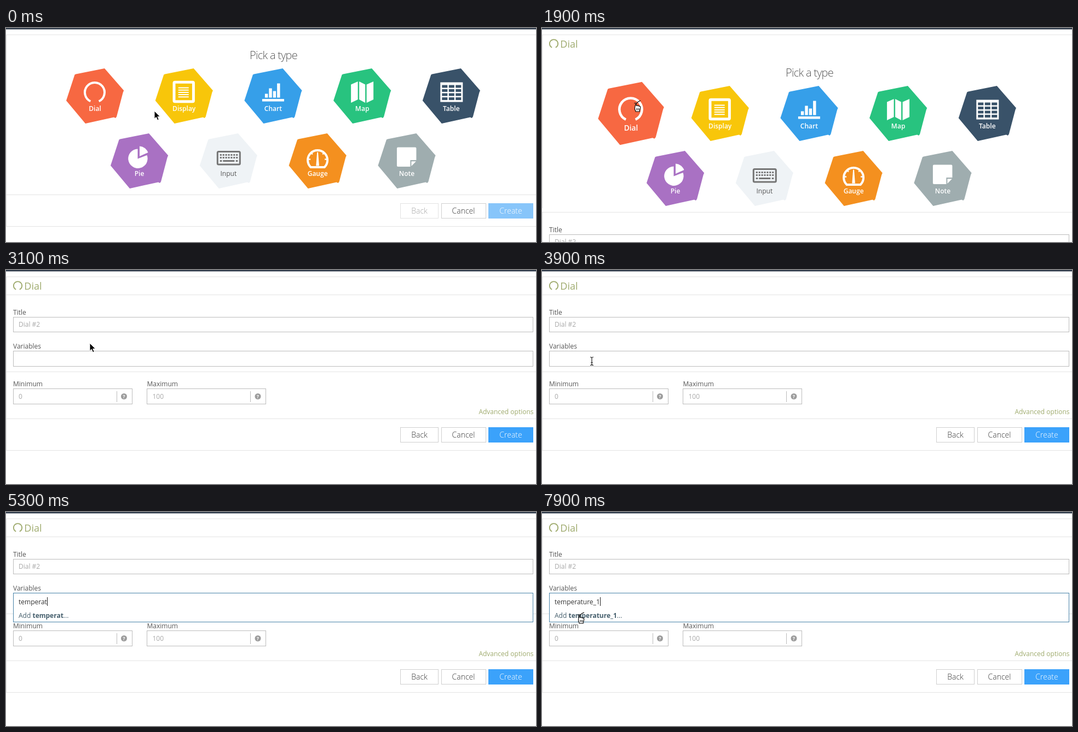
These frames come from a looping animation (968 by 392 pixels, 8000 ms). An HTML page:

```html
<!DOCTYPE html>
<html lang="en">
<head>
<meta charset="utf-8">
<title>Pick a type</title>
<style>
  html, body { margin: 0; width: 100%; height: 100%; overflow: hidden; background: #fff; }
  svg { display: block; width: 968px; height: 392px; font: 12px "Open Sans", sans-serif; fill: #555; }
  .edge { fill: none; stroke: #e4e4e4; }
  .field { fill: #fff; stroke: #bcbcbc; }
  .hint { fill: #a9a9a9; }
  .mid { text-anchor: middle; }
  .olive { fill: #9fab6e; }
  .w { fill: #fff; }
  .ws { fill: none; stroke: #fff; }
  .label { fill: #fff; font-weight: 600; }
  .btn { font-size: 14px; font-weight: 300; fill: #333; text-anchor: middle; }
  .name { font-weight: 700; fill: #465c6c; }
  .meta { font-size: 9px; fill: #4a4a4a; }
  .meta .val { font-weight: 300; fill: #7f8f9c; }
  .drop { fill: #fff; stroke: #4682a8; }
  .typed { fill: #333; }
  .add { fill: #435d6b; }
  .add tspan { font-weight: 700; }
</style>
</head>
<body>
<svg viewBox="0 0 968 392">
  <rect width="968" height="392" fill="#fff"/>
  <rect width="968" height="2.5" fill="#303b4b"/>
  <path class="edge" d="M968 12.5H.5V330"/>

  <g id="picker">
    <text class="mid" x="488.5" y="57" style="font-size:20px;font-weight:300;letter-spacing:-.75px">Pick a type</text>
    <g id="types"></g>
  </g>
  <g id="pickFoot" transform="translate(0 305)"></g>

  <g id="head">
    <path id="headIcon" fill="none" stroke="#9fab6e" stroke-width="1.8"/>
    <text class="olive" x="33.3" y="36" style="font-size:18px">Dial</text>
  </g>

  <g id="form">
    <rect y="45" width="968" height="347" fill="#fff"/>
    <path class="edge" d="M.5 45V272M0 45.5H968M0 186.5H968"/>
    <text x="13" y="82">Title</text>
    <rect class="field" x="13.5" y="86.5" width="949" height="27"/>
    <text class="hint" x="23" y="104">Dial #2</text>
    <text x="13" y="144">Variables</text>
    <rect class="field" x="13.5" y="148.5" width="949" height="28"/>
    <g id="limits"></g>
    <text class="olive" x="963.5" y="264" text-anchor="end">Advanced options</text>
    <g id="formFoot" transform="translate(0 272)"></g>
  </g>

  <g id="drop">
    <rect id="dropBox" class="drop" x="13.5" y="148.5" width="949"/>
    <text id="typed" class="typed" x="23" y="169"></text>
    <path id="caret" d="M23.5 156V172" stroke="#222"/>
    <g id="list"></g>
    <text id="add" class="add" x="23" y="194">Add <tspan id="addWord"></tspan>...</text>
  </g>

  <g id="cursor" stroke-linejoin="round">
    <path id="arrow" d="M0 0V14.3L3.3 11.3L5.7 16.8L8.2 15.7L5.8 10.3H10.3Z" fill="#000" stroke="#fff"/>
    <g id="hand">
      <path d="M-1.6 1C-1.6-.6 1-.6 1.2 1L2 5C2.4 3.9 4.3 4 4.6 5.3C5.3 4.6 6.8 4.9 7 6C8 5.5 9.2 6.2 9.2 7.4C9.4 10 8.6 11.6 7.8 13.2V15.5H.4V14C-1.6 12.2-3-.0 9.4-4.4 8C-5 6.6-3.2 5.7-2 6.9L-.6 8.3Z" fill="#fff" stroke="#000" stroke-width="1.1"/>
      <path d="M2.2 9.5V13M4.4 9.5V13M6.5 9.5V13" stroke="#000" stroke-width=".9"/>
    </g>
    <path id="beam" d="M-3-7.5Q0-7.5 0-5.5Q0-7.5 3-7.5M0-5.5V5.5M-3 7.5Q0 7.5 0 5.5Q0 7.5 3 7.5M-1.8 2.5H1.8" fill="none" stroke="#222" stroke-width="1.2"/>
  </g>
</svg>

<script>
const $ = id => document.getElementById(id);
const box = (x, y, w, h, more = 'class="w"') =>
  `<rect x="${x}" y="${y}" width="${w}" height="${h}" ${more}/>`;
const shape = (d, more = 'class="w"') => `<path d="${d}" ${more}/>`;
const line = (d, width, more = '') => shape(d, `class="ws" stroke-width="${width}" ${more}`);

// Ring with an opening at the bottom
function ring(x, y, r) {
  const dx = r * Math.sin(.44), dy = r * Math.cos(.44);
  return `M${x - dx} ${y + dy}A${r} ${r} 0 1 1 ${x + dx} ${y + dy}`;
}

function tableIcon() {
  let s = box(-20, -25, 41, 36);
  for (let i = 0; i < 12; i++)
    s += box(-17 + i % 3 * 12.5, -20 + Math.floor(i / 3) * 7.5, 10, 5, 'fill="#395269"');
  return s;
}

function gaugeIcon() {
  let s = line('M-12.5 11.5A18 18 0 1 1 12.5 11.5Z', 4, 'stroke-linejoin="round"');
  for (let a = -90; a <= 90; a += 45)
    if (a) s += box(-1.2, -18, 2.4, 5, `class="w" transform="translate(0 -3) rotate(${a})"`);
  return s + shape('M-.9-16H.9L2.8 9H-2.8Z');
}

const icons = {
  Dial: line(ring(-.5, -6.5, 18), 4),
  Display: box(-18.2, -25.2, 35.4, 35.4, 'class="ws" stroke-width="5" rx="1.5"') +
    line('M-10.5-15H8.5M-10.5-10.8H8.5M-10.5-6.6H8.5M-10.5-2.4H8.5M-10.5 1.8H8.5', 2),
  Chart: box(-20, 5.5, 40, 4.5) +
    [-4, -14, -9, -23].map((top, i) => box(-15 + i * 7.4, top, 5.4, 7 - 4 - top)).join(''),
  Map: shape('M-20.5-21L-8-26.5V6.5L-20.5 12.5ZM-5.5-26.5L5.5-21V12.5L-5.5 6.5ZM8-21L20.5-26.5V6.5L8 12.5Z'),
  Table: tableIcon(),
  Pie: shape('M-3-4V-22A17.7 17.7 0 1 0 14-10.5Z') + shape('M.5-8.5V-27A18 18 0 0 1 16-15.5Z'),
  Input: box(-20, -17, 41, 23.5, 'rx="2" fill="none" stroke="#757575" stroke-width="3"') +
    shape('M-15.5-11H17M-15.5-6H17', 'stroke="#757575" stroke-width="2.8" stroke-dasharray="3 1.9"') +
    shape('M-15.5 0H-12M-10 0H11M13.5 0H17', 'stroke="#757575" stroke-width="2.8"'),
  Gauge: gaugeIcon(),
  Note: shape('M-16-25H15.5Q17.5-25 17.5-23V-1.5H6.5V10.5H-16Q-18 10.5-18 8.5V-23Q-18-25-16-25Z') +
    shape('M8.5 .8H17L8.5 9.5Z')
};

const colors = {
  Dial: '#f76842', Display: '#f8c60a', Chart: '#369fe9', Map: '#28c37f', Table: '#395269',
  Pie: '#a971c3', Input: '#eff3f6', Gauge: '#f4901f', Note: '#9fadaf'
};
const hex = 'M17.5-50.5L52.7-10L51.2-6.5L39.5 38L37.5 40.5L34.5 39L-17.5 50.5L-52.5 8.5L-37-39L-35-40Z';

$('types').innerHTML = Object.keys(colors).map((name, i) => {
  const x = i < 5 ? 162.5 + i * 162.7 : 243.5 + (i - 5) * 162.8;
  const y = i < 5 ? 124.5 : 243.5;
  const label = name === 'Input' ? '' : ' label';
  return `<g transform="translate(${x} ${y})"><g id="type${name}">` +
    shape(hex, `fill="${colors[name]}"`) + icons[name] +
    `<text class="mid${label}" y="27.5">${name}</text></g></g>`;
}).join('');

$('headIcon').setAttribute('d', ring(21.5, 28.8, 7.7));

function footer(ready) {
  const back = ready ? '' : 'style="fill:#a5a5a5"';
  return box(0, .5, 969, 58, 'fill="#fff"') +
    shape('M.5 0V58.5H968M0 .5H968', 'class="edge"') +
    box(720.5, 16.5, 69, 27, `fill="#fff" stroke="${ready ? '#cfcfcf' : '#e2e2e2'}"`) +
    box(795.5, 16.5, 81, 27, 'fill="#fff" stroke="#cfcfcf"') +
    box(881, 16, 82, 28, `fill="${ready ? '#3ba2fb' : '#87c5fa'}"`) +
    `<text class="btn" x="755" y="35" ${back}>Back</text>` +
    '<text class="btn" x="835.5" y="35">Cancel</text>' +
    '<text class="btn" x="922" y="35" style="fill:#fff">Create</text>';
}
$('pickFoot').innerHTML = footer(false);
$('formFoot').innerHTML = footer(true);

$('limits').innerHTML = [[13, 'Minimum', 0], [257.5, 'Maximum', 100]].map(([x, name, value]) =>
  `<text x="${x}" y="213">${name}</text>` +
  box(Math.floor(x) + .5, 217.5, 217, 28, 'class="field"') +
  shape(`M${Math.floor(x) + 189.5} 222V242`, 'class="field"') +
  `<text class="hint" x="${x + 10}" y="236">${value}</text>` +
  `<circle cx="${x + 202.5}" cy="231.5" r="5.5" fill="#9c9c9c"/>` +
  `<text class="mid" x="${x + 202.5}" y="235" style="font-size:9px;font-weight:700;fill:#fff">?</text>`
).join('');

const stackIcon = shape('M23 201.5Q26.5 199.5 30 201.5V207.5Q26.5 209.5 23 207.5Z', 'fill="#444"') +
  line('M23 203.2H30M23 205.6H30', .6);
const cogsIcon = '<g fill="none" stroke="#444"><circle cx="26" cy="221" r="2" stroke-width="1.8"/>' +
  '<circle cx="30.7" cy="218.7" r="1" stroke-width="1.2"/><circle cx="30.7" cy="223.3" r="1" stroke-width="1.2"/></g>';
$('list').innerHTML = [
  ['gps_lastread', 'Zelorn GPS #1', 'Checagem de GPS'],
  ['bearing', 'App Tracking', 'Tulio APP V2'],
  ['bearing', 'App Tracking', 'Motoboy Tulio']
].map(([name, bucket, origin], i) =>
  `<g transform="translate(0 ${i * 57})"><text class="name" x="23" y="194">${name}</text>` +
  stackIcon + cogsIcon +
  `<text class="meta" x="33" y="208">Bucket: <tspan class="val">${bucket}</tspan></text>` +
  `<text class="meta" x="35" y="224">Origin: <tspan class="val">${origin}</tspan></text></g>`
).join('');

const LOOP = 8000, CLICK = 1900, FOCUS = 4000, TYPE = 4700;
const WORD = 'temperature_1';
const keyTime = i => i < 11 ? TYPE + i * 82 : [6150, 6500][i - 11];
const path = [
  [0, 271, 152], [400, 271, 152], [1350, 170, 134], [1600, 170.5, 137.5], [2300, 170.5, 137.5],
  [3000, 153, 134], [3200, 153, 134], [3900, 91, 167], [7300, 91, 167], [7700, 67.5, 188.5], [LOOP, 67.5, 188.5]
];
const looks = [[0, 'arrow'], [1450, 'hand'], [2200, 'arrow'], [3500, 'beam'], [TYPE, ''], [7300, 'beam'], [7550, 'hand']];

function ease(t, from, to) {
  const p = Math.min(1, Math.max(0, (t - from) / (to - from)));
  return p * p * (3 - 2 * p);
}
const show = (id, on) => $(id).style.display = on ? '' : 'none';
const move = (id, value) => $(id).setAttribute('transform', value);

function drawCursor(t) {
  const i = path.findIndex(p => t < p[0]);
  const [t0, x0, y0] = path[i - 1], [t1, x1, y1] = path[i];
  const p = ease(t, t0, t1);
  move('cursor', `translate(${x0 + (x1 - x0) * p} ${y0 + (y1 - y0) * p})`);
  const look = looks.filter(l => l[0] <= t).pop()[1];
  for (const id of ['arrow', 'hand', 'beam']) show(id, id === look);
}

function drawDrop(t) {
  show('drop', t >= FOCUS);
  if (t < FOCUS) return;
  const count = [...WORD].filter((c, i) => keyTime(i) <= t).length;
  const text = WORD.slice(0, count);
  show('list', !count);
  show('add', count);
  $('dropBox').setAttribute('height', count ? 53 : 208);
  $('typed').textContent = $('addWord').textContent = text;
  move('caret', `translate(${Math.round($('typed').getComputedTextLength())} 0)`);
  const since = t - (count ? keyTime(count - 1) : FOCUS);
  show('caret', since % 1000 < 500);
}

function draw(t) {
  const opened = t >= CLICK;
  move('picker', `translate(0 ${opened ? 32 : 0})`);
  move('typeDial', `scale(${1 + .145 * ease(t, 1450, 1850)})`);
  show('pickFoot', !opened);
  show('head', opened);
  show('form', opened);
  move('form', `translate(0 ${292 * (1 - ease(t, CLICK + 50, CLICK + 500))})`);
  drawDrop(t);
  drawCursor(t);
}

const start = performance.now();
function tick() {
  draw((performance.now() - start) % LOOP);
  requestAnimationFrame(tick);
}
tick();
</script>
</body>
</html>
```
